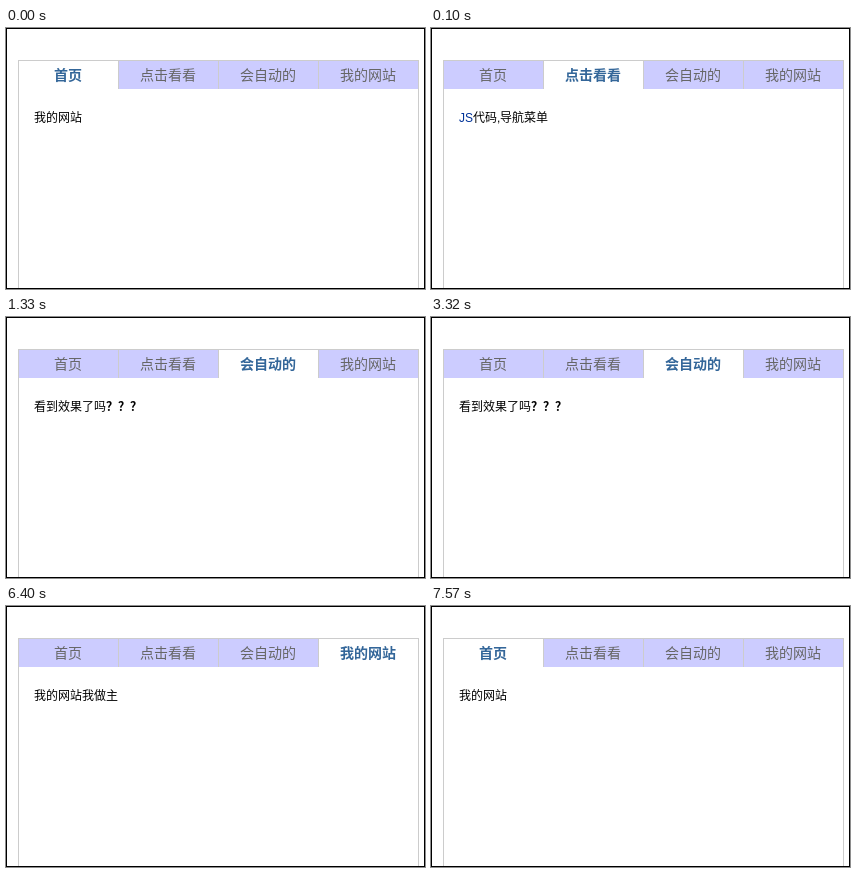
These frames come from a looping animation (419 px wide and 261 px high, 8000 ms). An HTML page with a canvas:

```html
<!DOCTYPE html>
<html lang="zh-CN">
<head>
<meta charset="utf-8">
<style>
  html, body { margin: 0; width: 100%; height: 100%; overflow: hidden; background: #fff; }
  canvas { display: block; }
</style>
</head>
<body>
<canvas id="stage" width="419" height="261"></canvas>
<script>
const ctx = document.getElementById("stage").getContext("2d", { alpha: false });
const WIDTH = 419, HEIGHT = 261, LOOP = 8000;
const LEFT = 12, TOP = 32, TAB = 100, TAB_HEIGHT = 28;
const FONT = '"Noto Sans CJK SC", "Noto Sans CJK", sans-serif';
const LATIN = '"Liberation Sans", Arial, sans-serif';

const labels = ["首页", "点击看看", "会自动的", "我的网站"];
const pages = [
  [["我的网站"]],
  [["JS", "#039", LATIN], ["代码"], [",", "#000", LATIN], ["导航菜单"]],
  [["看到效果了吗"], ["？？？", "#000", FONT, "bold"]],
  [["我的网站我做主"]]
];
const schedule = [[0, 0], [100, 1], [1330, 2], [4650, 3], [7570, 0]];

function rect(x, y, w, h, color) {
  ctx.fillStyle = color;
  ctx.fillRect(x, y, w, h);
}

function drawTab(label, i, active) {
  const x = LEFT + i * TAB;
  rect(x + 1, TOP + 1, TAB - 1, TAB_HEIGHT, active ? "#fff" : "#ccf");
  rect(x + TAB, TOP, 1, TAB_HEIGHT + 1, "#ccc");
  ctx.font = `${active ? "bold" : "normal"} 14px ${FONT}`;
  ctx.fillStyle = active ? "#369" : "#666";
  ctx.fillText(label, x + 50 - label.length * 7, 52);
}

function drawPage(runs) {
  let x = 28;
  for (const [text, color = "#000", family = FONT, weight = "normal"] of runs) {
    ctx.font = `${weight} 12px ${family}`;
    ctx.fillStyle = color;
    ctx.fillText(text, x, 94);
    x += Math.round(ctx.measureText(text).width);
  }
}

function draw(selected) {
  rect(0, 0, WIDTH, HEIGHT, "#000");
  rect(1, 1, WIDTH - 2, HEIGHT - 2, "#fff");
  rect(LEFT, TOP, 4 * TAB + 1, HEIGHT - TOP - 1, "#ccc");
  rect(LEFT + 1, TOP + 1, 4 * TAB - 1, HEIGHT - TOP - 2, "#fff");
  labels.forEach((label, i) => drawTab(label, i, i === selected));
  drawPage(pages[selected]);
}

const start = performance.now();
function tick() {
  const t = (performance.now() - start) % LOOP;
  draw(schedule.filter(([from]) => from <= t).pop()[1]);
  requestAnimationFrame(tick);
}
tick();
</script>
</body>
</html>
```
